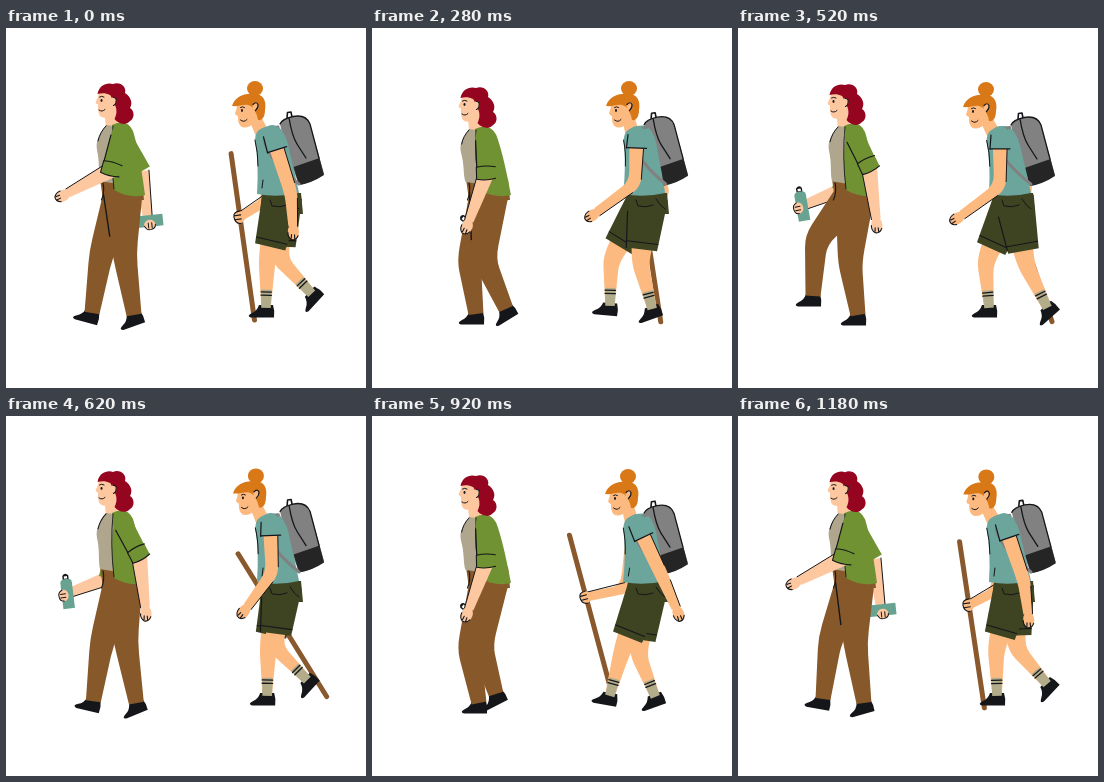
Write an HTML page with a canvas that moves like this. It is 360x360 px and loops after 1200 ms.

```html
<!DOCTYPE html>
<html lang="en">
<head>
<meta charset="utf-8">
<title>Two walkers</title>
<style>
  html, body { margin: 0; width: 100%; height: 100%; overflow: hidden; background: #fff; }
  canvas { display: block; width: 360px; height: 360px; }
</style>
</head>
<body>
<canvas id="stage"></canvas>
<script>
const LOOP = 1200, STEP = 20, INK = '#15161a';
const canvas = document.getElementById('stage');
const ctx = canvas.getContext('2d');
const dpr = window.devicePixelRatio || 1;
canvas.width = canvas.height = 360 * dpr;

// ---- Motion: rows of [time, values...], joined by a periodic smooth curve
const walkerA = {
  sway: [[0, 0, 0], [130, 0, 0], [280, -3, 4], [320, -3, 4], [520, 0, 1]],
  // knee x y, ankle x y, foot angle
  leg: [
    [0, 95, 226, 86, 285, 15], [130, 98, 226, 95, 285, 0], [280, 97, 234, 104, 286, 0],
    [320, 97, 234, 107, 287, 0], [520, 112, 235, 120, 287, 0], [590, 118, 227, 127, 287, -18],
    [730, 124, 228, 141, 287, -32], [880, 112, 232, 134, 281, -32], [920, 109, 230, 124, 278, -27],
    [1120, 78, 212, 75, 268, 0], [1180, 92, 224, 85, 283, 10]
  ],
  // shoulder, elbow, wrist
  near: [
    [0, 115, 106, 105, 142, 62, 165], [120, 115, 106, 106, 143, 68, 173], [280, 113, 109, 114, 146, 97, 193],
    [520, 116, 107, 131, 138, 138, 191], [740, 116, 107, 131, 141, 130, 192],
    [920, 113, 109, 114, 146, 97, 193], [1180, 115, 106, 105, 142, 61, 165]
  ],
  // elbow, hand, bottle angle
  far: [
    [0, 136, 143, 142, 193, -96], [120, 134, 144, 135, 197, -95], [280, 118, 152, 104, 201, -50],
    [520, 103, 162, 64, 178, -10], [740, 104, 160, 69, 183, -14],
    [920, 118, 152, 104, 201, -50], [1180, 136, 143, 143, 194, -96]
  ]
};
const walkerB = {
  sway: [[0, 0, 0], [130, 7, -4], [280, 8, 0], [320, 7, 0], [520, -1, 1]],
  pack: [[0, 0, 0], [130, 0, -3], [300, -2, 1], [520, -1, 1]],
  leg: [
    [0, 261, 232, 260, 279, 0], [130, 266, 235, 268, 279, 0], [280, 268, 235, 280, 280, -20],
    [320, 266, 238, 283, 280, -20], [520, 288, 237, 309, 279, -42], [590, 276, 232, 307, 266, -47],
    [720, 241, 226, 273, 259, -45], [740, 247, 224, 267, 264, -42], [880, 239, 231, 238, 277, 5],
    [920, 250, 235, 238, 279, 10], [1120, 247, 234, 251, 279, 0], [1180, 258, 233, 259, 279, 0]
  ],
  near: [
    [0, 266, 106, 285, 165, 287, 198], [120, 267, 105, 270, 151, 255, 195], [280, 265, 107, 263, 156, 225, 184],
    [520, 262, 107, 262, 159, 224, 187], [740, 267, 105, 274, 155, 269, 195],
    [920, 265, 107, 290, 160, 304, 192], [1180, 266, 106, 286, 165, 290, 198]
  ],
  // elbow, hand, staff angle
  far: [
    [0, 262, 172, 234, 189, 8], [120, 276, 168, 250, 190, 8.2], [280, 293, 164, 273, 191, 8.7],
    [520, 289, 158, 281, 195, 18.5], [740, 263, 170, 241, 187, 43.6],
    [920, 254, 173, 214, 181, 15], [1180, 260, 174, 231, 189, 8.5]
  ]
};

function at(keys, time, span = LOOP) {
  const n = keys.length, t = time % span;
  let i = keys.findIndex(k => k[0] > t);
  i = (i < 0 ? n : i) - 1;
  const row = j => keys[(j + n) % n];
  const when = j => row(j)[0] + span * Math.floor(j / n);
  const slope = (j, c) => (row(j + 1)[c] - row(j - 1)[c]) / (when(j + 1) - when(j - 1));
  const d = when(i + 1) - when(i), u = (t - when(i)) / d;
  const u2 = u * u, u3 = u2 * u;
  return row(i).slice(1).map((v, k) => {
    const c = k + 1;
    return (2 * u3 - 3 * u2 + 1) * v + (3 * u2 - 2 * u3) * row(i + 1)[c]
      + d * ((u3 - 2 * u2 + u) * slope(i, c) + (u3 - u2) * slope(i + 1, c));
  });
}

// ---- Drawing helpers
const mix = (a, b, u) => [a[0] + (b[0] - a[0]) * u, a[1] + (b[1] - a[1]) * u];
const rad = a => a * Math.PI / 180;

function fill(path, color) {
  ctx.fillStyle = color;
  ctx.fill(typeof path === 'string' ? new Path2D(path) : path);
}

function ink(path, width = 1.2, color = INK) {
  ctx.strokeStyle = color;
  ctx.lineWidth = width;
  ctx.stroke(typeof path === 'string' ? new Path2D(path) : path);
}

function local(x, y, angle, draw) {
  ctx.save();
  ctx.translate(x, y);
  ctx.rotate(angle);
  draw();
  ctx.restore();
}

// Shifts the top of a torso while its base line stays put
function lean(dx, dy, base, draw) {
  const h = base - 98;
  ctx.save();
  ctx.transform(1, 0, -dx / h, 1 - dy / h, dx * base / h, dy * base / h);
  draw();
  ctx.restore();
}

function dot(x, y, rx, ry, color) {
  ctx.beginPath();
  ctx.ellipse(x, y, rx, ry, 0, 0, 7);
  ctx.fillStyle = color;
  ctx.fill();
}

function edge(pts, w, side) {
  return pts.map((p, i) => {
    const a = pts[Math.max(i - 1, 0)], b = pts[Math.min(i + 1, pts.length - 1)];
    const dir = Math.atan2(b[1] - a[1], b[0] - a[0]);
    return [p[0] - side * w[i] * Math.sin(dir), p[1] + side * w[i] * Math.cos(dir)];
  });
}

function trace(path, pts) {
  path.lineTo(...pts[0]);
  if (pts.length > 2) {
    path.lineTo(...mix(pts[0], pts[1], .8));
    path.quadraticCurveTo(...pts[1], ...mix(pts[1], pts[2], .2));
  }
  path.lineTo(...pts[pts.length - 1]);
}

function limb(pts, w, color) {
  const path = new Path2D();
  trace(path, edge(pts, w, 1));
  trace(path, edge(pts, w, -1).reverse());
  path.closePath();
  fill(path, color);
  return path;
}

function line(a, b, width, color) {
  const path = new Path2D();
  path.moveTo(...a);
  path.lineTo(...b);
  ink(path, width, color);
}

function across(a, b, u, w, width, color) {
  const p = edge([mix(a, b, u), b], [w, w], 1)[0];
  const q = edge([mix(a, b, u), b], [w, w], -1)[0];
  line(p, q, width, color);
}

function fist(from, wrist, color) {
  const dir = Math.atan2(wrist[1] - from[1], wrist[0] - from[0]);
  local(...wrist, dir, () => {
    dot(6, 0, 8, 5.6, color);
    ink('M10 -4.5 Q15 -2 13.5 2.5 Q11 6 6 5.5 M13 -1 L9 -1 M12 2.5 L8.5 2', 1.1);
  });
}

function shoe(x, y, angle) {
  local(x, y, rad(angle), () =>
    fill('M-7 -2 L7 -2 Q9 4 8 10.5 L-15 10.5 Q-20 9 -14 6 Q-9 4 -7 -2Z', INK));
}

// ---- Walker with the bottle
const A = {
  skin: '#fdc7a0', hair: '#96051f', green: '#709233', shirt: '#b0a68e', pants: '#87592a', teal: '#67a390'
};

function pantLeg(phase) {
  const [kx, ky, ax, ay, turn] = at(walkerA.leg, phase);
  const pts = [[117, 166], [kx, ky], [ax, ay]], w = [19.5, 12, 7.5];
  shoe(ax, ay, turn);
  return { path: limb(pts, w, A.pants), front: edge(pts, w, 1) };
}

function bottleArm(t, shoulder) {
  const [ex, ey, hx, hy, turn] = at(walkerA.far, t);
  limb([[ex, ey], [hx, hy]], [7, 4.5], A.skin);
  line(...edge([[ex, ey], [hx, hy]], [7, 4.5], -1), 1);
  limb([shoulder, [ex, ey]], [9, 9], A.green);
  local(hx, hy, rad(turn), () => {
    fill('M-3 -14 L-3 -18 Q0 -22 3 -18 L3 -14Z', INK);
    fill('M-1.6 -15 L-1.6 -17.5 L1.6 -17.5 L1.6 -15Z', '#fff');
    fill('M-5.8 -11 Q-5.5 -14 -2.5 -14.5 L2.5 -14.5 Q5.5 -14 5.8 -11 L5.8 15 L-5.8 15Z', A.teal);
    dot(-4, 1.5, 5, 5.8, A.skin);
    ink('M-5 -4 Q-10 -2 -8.5 3 Q-8 7 -4 7 M-7 0 L-2 0 M-7 3.5 L-2 3.5', 1);
  });
}

function headA() {
  fill('M93 65 Q92 70 89.5 74 Q90 76 92 76.5 Q91.5 84 94 88 Q97 91 102 89 L111 84 L110 64Z', A.skin);
  fill('M91.5 66 C93 57 101 54 107 56 C114 53 121 59 119 65 C125 69 127 75 124 80 C129 83 128.5 91 124 93'
    + ' C120 98 112 96 108.5 91 C111 86 111 81 109 77 C106 73 106 69 104 67 C100 65 96 65 91.5 66Z', A.hair);
  dot(107.5, 73, 2.8, 4, A.skin);
  ink('M107 69.5 Q111 69 110 74 Q109.5 77 107.5 77.5', 1.1);
  dot(95.5, 72.5, 1, 1.4, INK);
  ink('M93.5 69 Q95.5 67.5 98 69 M93 82 Q96 84.5 99 81.5', 1);
}

function drawA(t) {
  const [dx, dy] = at(walkerA.sway, t, 600);
  const [sx, sy, ex, ey, wx, wy] = at(walkerA.near, t);
  const S = [sx, sy], E = [ex, ey], W = [wx, wy];

  bottleArm(t, S);
  const far = pantLeg(t), near = pantLeg(t + 600);
  fill('M94 151 L136 151 L138 172 L97 172Z', A.pants);

  // The near thigh is outlined only where it overlaps the far one
  ctx.save();
  ctx.clip(far.path);
  line(near.front[0], mix(near.front[0], near.front[1], .68), 1.4);
  ctx.restore();
  ink('M97 155 Q99 163 95.5 172', 1.1);

  limb([[104 + dx, 84 + dy], [107 + dx * .8, 106 + dy * .8]], [5.5, 6.5], A.skin);
  lean(dx, dy, 168, () => {
    fill('M100 97 C95 104 89 112 91 122 C94 135 92 144 94 153 L112 156 L116 99Z', A.shirt);
    fill('M106 97 Q121 90 127 103 Q133 122 139 167 Q124 171 108 162 Q104 130 108 106Z', A.green);
    ink('M100 98 Q94 104 92 113', 1);
    ink('M107 98 Q104 128 108 161', .9);
  });
  ctx.save();
  ctx.translate(dx, dy);
  headA();
  ctx.restore();

  const fore = [E, W], w = [8, 4.6];
  limb(fore, w, A.skin);
  line(...edge(fore, w, 1), 1);
  fist(E, W, A.skin);
  dot(...S, 9.5, 9.5, A.green);
  const sleeve = [S, E], sw = [9.5, 9];
  limb(sleeve, sw, A.green);
  const rim = edge(sleeve, sw, 1);
  line(mix(...rim, .1), mix(...rim, .85), 1.2);
  local(...E, Math.atan2(ey - sy, ex - sx) - Math.PI / 2, () => {
    const cuff = 'M-9.5 -7 Q0 -9 9.5 -7 L9.5 4.5 Q0 7 -9.5 5Z';
    fill(cuff, A.green);
    ink('M9.5 -7 Q0 -9 -9.5 -7 L-9.5 5 Q0 7 9.5 4.5', 1.1);
  });
}

// ---- Walker with the staff
const B = {
  skin: '#fdba80', hair: '#d97817', teal: '#6ca59c', shorts: '#3e4321', sock: '#b2ac8b',
  pack: '#818181', base: '#252525', wood: '#89592d'
};
const HIP = [276, 170];

function bareLeg(phase) {
  const [kx, ky, ax, ay, turn] = at(walkerB.leg, phase);
  const K = [kx, ky], ankle = [ax, ay];
  limb([HIP, K, ankle], [16, 8.5, 4.8], B.skin);
  shoe(ax, ay, turn);
  limb([mix(K, ankle, .63), mix(K, ankle, 1.02)], [5.2, 4.8], B.sock);
  across(K, ankle, .68, 5.2, 1.3);
  across(K, ankle, .75, 5.2, 1.3);

  const hem = mix(HIP, K, .79), pts = [HIP, hem], w = [20, 15.5];
  const path = limb(pts, w, B.shorts);
  across(HIP, hem, .87, 15.5, 1.1);
  return { path, front: edge(pts, w, 1) };
}

function staffArm(t) {
  const [ex, ey, hx, hy, turn] = at(walkerB.far, t);
  local(hx, hy, rad(-turn), () => line([0, -64], [0, 104], 5, B.wood));
  limb([[262, 108], [ex, ey], [hx, hy]], [7, 6.5, 4.5], B.skin);
  line(...edge([[ex, ey], [hx, hy]], [6.5, 4.5], 1), 1);
  local(hx, hy, rad(-turn), () => {
    dot(-.5, 0, 5.5, 6.2, B.skin);
    ink('M1 -6 Q-6 -6 -6 -1 Q-6 6 0 6.5 M-5 -2 L1 -2 M-5 2 L1 2', 1.1);
  });
}

function backpack() {
  ink('M281 90 L281.5 84.5 L285 84 L286 89', 1.6);
  fill('M274 96 Q276 91 287 88.5 Q300 86 304 96 L318 146 Q306 155 293 157 L280 122Z', B.pack);
  fill('M287.5 139 L313.5 130 L318 147 Q306 155 293 157Z', B.base);
  ink('M274 96 Q276 91 287 88.5 Q300 86 304 96 L313 130 M283 90 Q286 108 291 116 L300 130', 1.3);
}

function headB() {
  dot(249, 60.5, 8, 7.5, B.hair);
  fill('M231 76 Q231 81 229 85.5 Q230 87.5 232 88 Q231.5 95 234.5 98 Q238 101 244 98 L254 92 L253 74Z', B.skin);
  fill('M226 78 C229 69 238 65 247 66 C257 65 261 73 259 82 C259 89 256 93 252 92'
    + ' C251 86 249 83 246 79 C240 74 234 79 226 78Z', B.hair);
  dot(249.5, 78.5, 3, 4, B.skin);
  ink('M247 76.5 Q250 73 252 76.5 Q252.5 80 249.5 82.5', 1.2);
  dot(236, 82.5, 1, 1.4, INK);
  ink('M234.5 79.5 Q236.5 78 238.5 79.5 M234.5 92 Q238 95 241 91.5', 1);
}

function drawB(t) {
  const [dx, dy] = at(walkerB.sway, t, 600);
  const [px, py] = at(walkerB.pack, t, 600);
  const [sx, sy, ex, ey, wx, wy] = at(walkerB.near, t);
  const S = [sx, sy], E = [ex, ey], W = [wx, wy];

  staffArm(t);
  const far = bareLeg(t + 600), near = bareLeg(t);
  fill('M256 165 L295 165 L297 186 L254 186Z', B.shorts);
  ctx.save();
  ctx.clip(far.path);
  line(mix(...near.front, .3), near.front[1], 1.2);
  ctx.restore();
  ink('M264 172 L266 178 Q274 180 281 177 M284 171 Q288 178 293 181', 1);

  ctx.save();
  ctx.translate(px, py);
  backpack();
  ctx.restore();

  limb([[248 + dx, 88 + dy], [257 + dx * .45, 107 + dy * .45]], [6, 7], B.skin);
  lean(dx * .4, dy * .5, 168, () => {
    fill('M253 102 Q262 96 272 98 Q281 106 284 125 Q289 145 293 165 Q272 170 251 166 Q253 135 249 113 Q249 105 253 102Z', B.teal);
    ink('M272 99 Q258 102 259 115 Q264 133 293 156', 3, B.pack);
    ink('M249 112 Q252 124 252 138 M257 152 L256 160', 1);
  });
  ctx.save();
  ctx.translate(dx, dy);
  headB();
  ctx.restore();

  const arm = [S, E, W], w = [7.5, 6.5, 4.6];
  limb(arm, w, B.skin);
  const rim = edge(arm, w, -1);
  line(mix(rim[0], rim[1], .25), mix(rim[0], rim[1], .85), 1);
  line(mix(rim[1], rim[2], .2), rim[2], 1);
  fist(E, W, B.skin);
  dot(...S, 9, 9, B.teal);
  const end = mix(S, E, .27);
  const sleeve = [S, end], sw = [9, 10];
  limb(sleeve, sw, B.teal);
  const front = edge(sleeve, sw, 1);
  line(front[0], front[1], 1.2);
  across(S, E, .265, 10, 1.3);
}

function render(now) {
  const t = Math.floor(now % LOOP / STEP) * STEP;
  ctx.setTransform(dpr, 0, 0, dpr, 0, 0);
  ctx.fillStyle = '#fff';
  ctx.fillRect(0, 0, 360, 360);
  ctx.lineCap = ctx.lineJoin = 'round';
  drawA(t);
  drawB(t);
}

function tick() {
  render(performance.now());
  requestAnimationFrame(tick);
}
tick();
</script>
</body>
</html>
```
